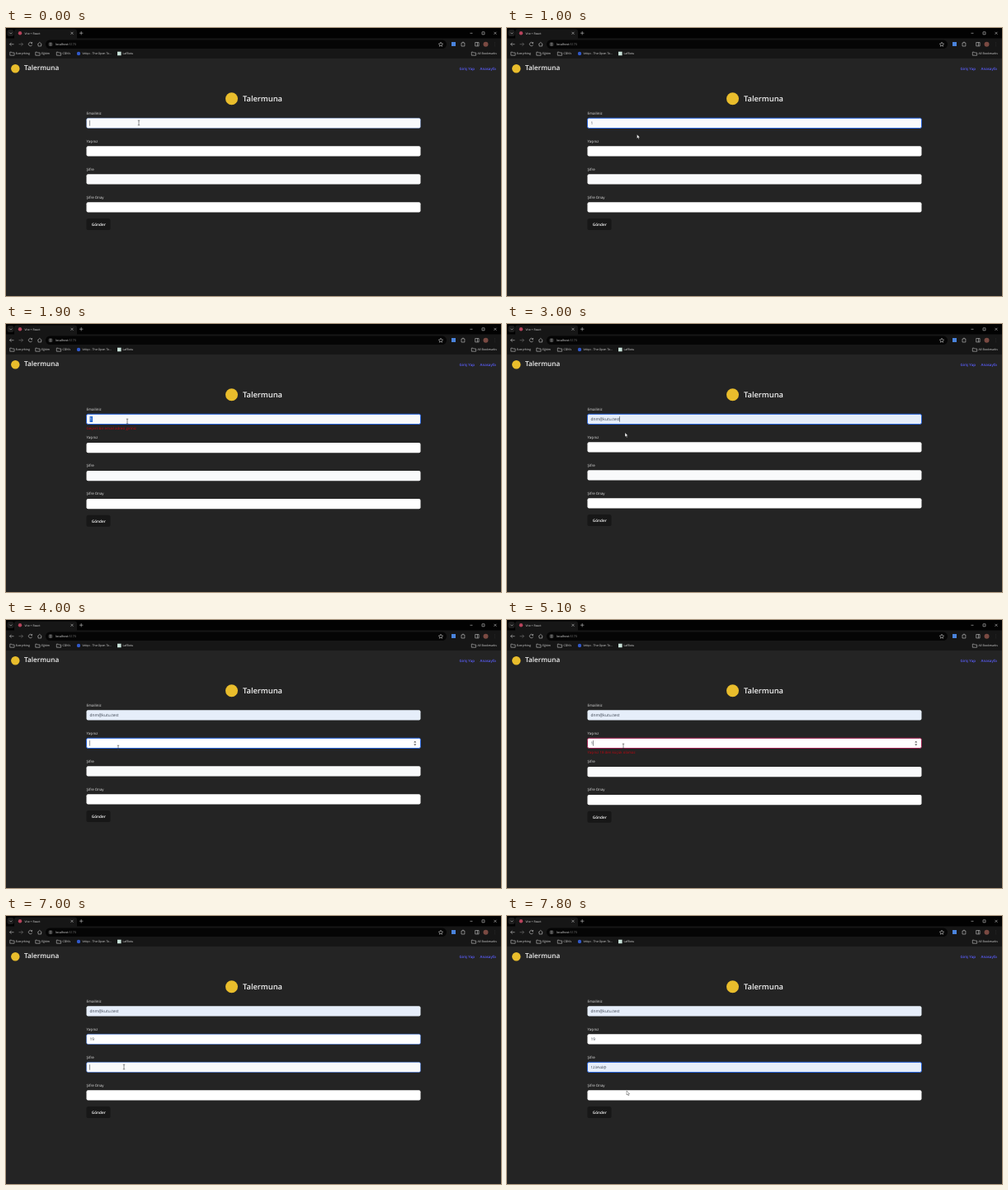
Recreate the animation shown at these times as an HTML page. Size 600x325 px, loop 8000 ms.

```html
<!DOCTYPE html>
<html lang="tr">
<head>
<meta charset="utf-8">
<title>Talermuna</title>
<style>
html, body { margin: 0; width: 100%; height: 100%; overflow: hidden; background: #242424; }
svg { display: block; width: 600px; height: 325px; font-family: "Open Sans", sans-serif; text-rendering: geometricPrecision; }
.bar { font-size: 3.5px; fill: #ddd; }
.icon { fill: none; stroke: #c4c4c4; stroke-width: .6; }
.link { font-size: 4.4px; font-weight: 600; fill: #5b5fff; }
.brand { font-weight: 600; fill: #f2f2f2; }
.label { font-size: 4.4px; fill: #e6e6e6; }
.value { font-size: 4.9px; fill: #333b48; }
.error { font-size: 4.4px; fill: #c00510; }
</style>
</head>
<body>
<svg id="stage" viewBox="0 0 600 325">
  <rect width="600" height="325" fill="#242424"/>
  <rect width="600" height="13" fill="#020202"/>
  <rect y="12.5" width="600" height="24.5" fill="#161616"/>
  <rect x="10" y="1.5" width="76" height="14" rx="3" fill="#161616"/>
  <rect x="48" y="14.5" width="486" height="10.5" rx="5.2" fill="#050505"/>
  <rect x="1.5" y="2" width="8" height="8" rx="2.5" fill="#1c1c1c"/>
  <circle cx="17" cy="6.3" r="2.2" fill="#b8435c"/>
  <circle cx="54" cy="19.7" r="2.7" fill="#2b2b2b"/>
  <rect x="540" y="17" width="5" height="5" fill="#4a83dc"/>
  <circle cx="581.5" cy="19.7" r="3" fill="#7a4a42"/>
  <circle cx="88" cy="31" r="2.2" fill="#3159c9"/>
  <rect x="135" y="28.7" width="4.6" height="4.6" fill="#c9e2d9"/>
  <g class="icon">
    <path d="M4.3 5.6l1.5 1.5 1.5-1.5M78.5 4.8l3 3m0-3l-3 3M91.2 4v4.4M89 6.2h4.4"/>
    <path d="M9.5 19.7h-5m2-2l-2 2 2 2"/>
    <path d="M15.5 19.7h5m-2-2l2 2-2 2" stroke="#777"/>
    <path d="M31.4 18.4a2.2 2.2 0 1 0 .2 2M31.6 17v1.6h-1.6M38.2 19.8l2.6-2.4 2.6 2.4M39 19.4v2.6h3.6v-2.6"/>
    <path d="M52.6 18.7h2.8M52.6 20.7h2.8"/>
    <path d="M527 17.2l.8 1.7 1.8.2-1.3 1.3.3 1.8-1.6-.9-1.6.9.3-1.8-1.3-1.3 1.8-.2z"/>
    <path d="M552 18h1.4v-.8h1.2v.8h1.3v4H552zM568.7 17.5h4.4v4.4h-4.4zM571.4 17.5v4.4"/>
    <path d="M562.5 6.3h3M577 4.8h3v3h-3zM591.5 4.8l3 3m0-3l-3 3"/>
    <path d="M592.5 17.7h.1m-.1 2h.1m-.1 2h.1" stroke-width="1"/>
    <path id="folder" d="M4.8 29.2h1.8l.7.8h2.8v3.2H4.8z"/>
    <use href="#folder" x="31"/><use href="#folder" x="56.5"/><use href="#folder" x="559.5"/>
  </g>
  <g class="bar">
    <text x="22.5" y="7.6">Vite + React</text>
    <text x="60" y="21" font-size="3.7">localhost<tspan fill="#888">:5173</tspan></text>
    <text x="11.7" y="32.3">Everything</text>
    <text x="43" y="32.3">Eğitim</text>
    <text x="68.5" y="32.3">CDN's</text>
    <text x="92.5" y="32.3">Velqo - The Open To...</text>
    <text x="141.5" y="32.3">LafBotu</text>
    <text x="571.5" y="32.3">All Bookmarks</text>
  </g>
  <g fill="#e9bd2c"><circle cx="11.3" cy="49.3" r="5.2"/><circle cx="273.5" cy="85.7" r="7.5"/></g>
  <text class="brand" x="22" y="51.4" font-size="8.2">Talermuna</text>
  <text class="brand" x="287" y="89" font-size="9.3">Talermuna</text>
  <text class="link" x="549.5" y="51">Giriş Yap</text>
  <text class="link" x="574.5" y="51">Anasayfa</text>
</svg>
<script>
const stage = document.getElementById('stage');
const LOOP = 8000, FADE = 200, SHIFT = 0.8;
const BLUE = [38, 99, 220, 1], RED = [200, 10, 35, 1], NONE = [38, 99, 220, 0];

// [time, focused field]; -1 means the last field was left while invalid
const focus = [[-50, 0], [1100, -1], [1700, 0], [3550, 1], [4600, -1], [5050, 1], [6900, 2]];
const values = [
  [[0, ''], [450, '1'], [2300, 'd'], [2400, 'dn'], [2500, 'dnm'], [2700, 'dnm@kutu.test']],
  [[0, ''], [4100, '1'], [6400, '19']],
  [[0, ''], [7300, '123Asd@']],
  [[0, '']]
];
const autofill = [2700, Infinity, 7300, Infinity];
const errors = [
  { from: 1100, to: 2750, row: 0, text: 'Geçerli bir email adresi giriniz' },
  { from: 4600, to: 6400, row: 1, text: 'Yaşınız 18 den küçük olamaz' }
];
// [time, x, y]
const path = [
  [0, 161, 115], [400, 161, 115], [700, 158, 108], [1000, 157.5, 129], [1200, 159, 131],
  [1300, 159, 131], [1600, 147, 118], [2700, 147, 118], [3400, 137, 153], [3550, 137, 153],
  [3700, 136, 155], [4000, 136, 155], [4500, 158, 164], [4800, 158, 167], [4900, 158, 167],
  [5050, 141, 153], [6400, 141, 153], [6850, 143, 183], [7300, 143, 183], [7750, 145, 212]
];

function add(parent, tag, attrs, text = '') {
  const node = document.createElementNS('http://www.w3.org/2000/svg', tag);
  set(node, attrs);
  node.textContent = text;
  return parent.appendChild(node);
}
function set(node, attrs) {
  for (const key in attrs) node.setAttribute(key, attrs[key]);
}
const show = (node, on) => set(node, { visibility: on ? 'visible' : 'hidden' });
const lastIndex = (steps, t) => steps.reduce((found, step, i) => step[0] <= t ? i : found, 0);
const mix = (a, b, k) => a + (b - a) * k;

const rows = ['Emailiniz', 'Yaşınız', 'Şifre', 'Şifre Onay'].map((label, i) => {
  const top = 109.3 + 34 * i;
  const group = add(stage, 'g');
  add(group, 'text', { class: 'label', x: 97.5, y: top - 4.6 }, label);
  const box = add(group, 'rect', { x: 97.5, y: top, width: 405, height: 12.2, rx: 2, 'stroke-width': 1 });
  const mark = add(group, 'rect', { x: 101.5, y: top + 2.7, width: 3.6, height: 7, fill: '#2d6cd2' });
  const text = add(group, 'text', { class: 'value', x: 101.4, y: top + 7.9 });
  if (i === 2) text.style.fontSize = '4.4px';
  const caret = add(group, 'rect', { y: top + 2.8, width: 0.5, height: 6.6, fill: '#20242c' });
  return { top, group, box, mark, text, caret };
});
const spinner = add(rows[1].group, 'path', { d: 'M494.3 148.6l1.5-1.8 1.5 1.8zM494.3 150.5l1.5 1.8 1.5-1.8z', fill: '#444' });
for (const error of errors)
  error.node = add(stage, 'text', { class: 'error', x: 97.5, y: rows[error.row].top + 18.2 }, error.text);

const button = add(stage, 'g');
add(button, 'rect', { x: 97.5, y: 231, width: 29, height: 14, rx: 2.6, fill: '#171717' });
add(button, 'text', { x: 103.8, y: 239.8, fill: '#fff', 'font-size': 4.7, 'font-weight': 600 }, 'Gönder');

const arrow = add(stage, 'path', { d: 'M0 0v5l1.2-1 .8 1.8.8-.4-.8-1.7h1.6z', fill: '#fff', stroke: '#111', 'stroke-width': 0.35 });
const beam = add(stage, 'path', { d: 'M-1.2-2.8h2.4M0-2.8v5.6M-1.2 2.8h2.4', fill: 'none', stroke: '#333', 'stroke-width': 0.55 });

function ringColor(row, step) {
  if (step < 0) return NONE;
  if (focus[step][1] === row) return BLUE;
  return focus[step][1] < 0 && focus[step - 1][1] === row ? RED : NONE;
}

function pointer(t) {
  const i = lastIndex(path, t), a = path[i], b = path[i + 1] || a;
  const k = b === a ? 0 : (t - a[0]) / (b[0] - a[0]);
  const ease = k * k * (3 - 2 * k);
  return [mix(a[1], b[1], ease), mix(a[2], b[2], ease)];
}

function draw(t) {
  const step = lastIndex(focus, t);
  const [focusTime, focused] = focus[step];
  const fade = Math.min(1, (t - focusTime) / FADE);
  const active = errors.find(e => t >= e.from && t < e.to);
  const shift = row => `translate(0 ${active && row > active.row ? SHIFT : 0})`;

  rows.forEach((row, i) => {
    const [typed, value] = values[i][lastIndex(values[i], t)];
    const from = ringColor(i, step - 1), to = ringColor(i, step);
    const base = i % 2 ? '#fff' : '#f9fafb';
    const selected = i === 0 && t >= 1700 && t < 2300;
    const blinkOn = (t - Math.max(typed, focusTime)) % 1000 < 500;
    set(row.group, { transform: shift(i) });
    set(row.box, {
      fill: t >= autofill[i] ? '#e6eefa' : base,
      stroke: `rgba(${from.map((c, n) => mix(c, to[n], fade))})`
    });
    row.text.textContent = value;
    row.text.style.fill = selected ? '#fff' : '';
    show(row.mark, selected);
    set(row.caret, { x: 101.4 + (value ? row.text.getComputedTextLength() : 0) });
    show(row.caret, focused === i && blinkOn && !selected);
  });
  set(button, { transform: shift(4) });
  show(spinner, focused === 1);
  for (const error of errors) show(error.node, error === active);

  const [x, y] = pointer(t);
  const overField = rows.some(row => y > row.top + 1.5 && y < row.top + 12.5);
  for (const node of [arrow, beam]) set(node, { transform: `translate(${x} ${y})` });
  show(beam, overField);
  show(arrow, !overField);
}

function tick() {
  draw(performance.now() % LOOP);
  requestAnimationFrame(tick);
}
tick();
</script>
</body>
</html>
```
